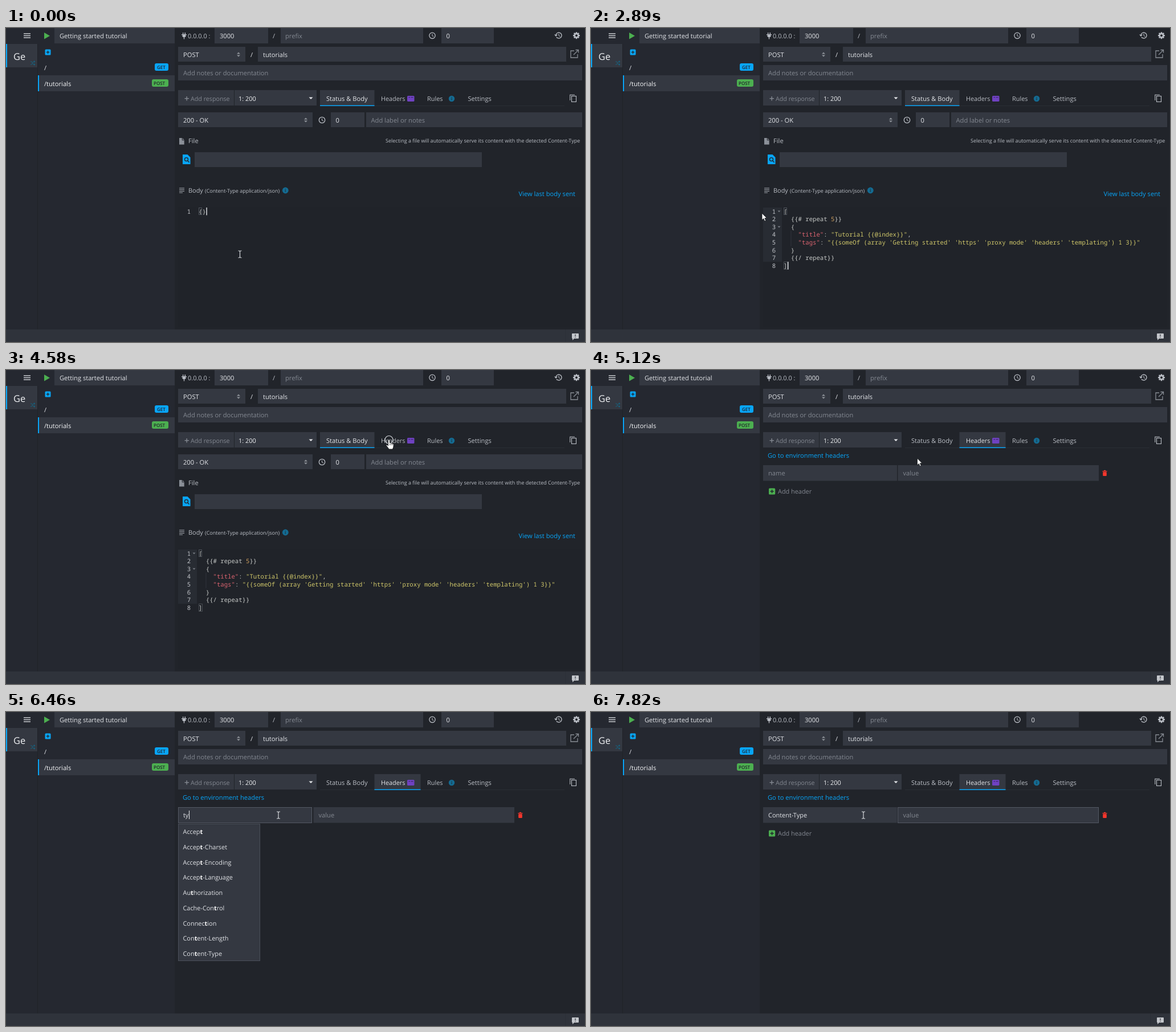
Recreate the animation shown at these times as an HTML page with a canvas. Size 1016x551 px, loop 8 s.

```html
<!DOCTYPE html>
<html lang="en">
<head>
<meta charset="utf-8">
<title>Mock response editor</title>
<style>
html, body { margin: 0; width: 100%; height: 100%; overflow: hidden; background: #21242a; }
canvas { display: block; width: 1016px; height: 551px; }
</style>
</head>
<body>
<canvas id="stage" width="1016" height="551"></canvas>
<script>
const ctx = document.getElementById('stage').getContext('2d');
const LOOP = 8000, STEP = 90;
const SANS = '"Open Sans", "Noto Sans", sans-serif';
const MONO = '"Noto Sans Mono", "DejaVu Sans Mono", monospace';
const C = {
  main: '#21242a', side: '#252830', field: '#343841', foot: '#2f333b', edge: '#1f2227',
  text: '#e2e4e8', soft: '#b9bdc4', mute: '#838891', blue: '#08a5f8', green: '#4caf50',
  purple: '#6f42c1', red: '#f5362c', info: '#146b92', code: '#c5c8c6', key: '#dc6470',
  str: '#cfc76a', num: '#d0a05f'
};

// ---- drawing helpers ----
function box(x0, y0, x1, y1, color, r) {
  ctx.fillStyle = color;
  ctx.beginPath();
  ctx.roundRect(x0, y0, x1 - x0, y1 - y0, r || 0);
  ctx.fill();
}
function text(s, x, y, color = C.text, size = 11.15, weight = 400, family = SANS) {
  ctx.font = `${weight} ${size}px ${family}`;
  ctx.fillStyle = color;
  ctx.fillText(s, x, y);
  return ctx.measureText(s).width;
}
function shape(pts, fill, stroke, width = 1, close = true) {
  ctx.beginPath();
  for (let i = 0; i < pts.length; i += 2) ctx.lineTo(pts[i], pts[i + 1]);
  if (close) ctx.closePath();
  if (fill) { ctx.fillStyle = fill; ctx.fill(); }
  if (stroke) { ctx.strokeStyle = stroke; ctx.lineWidth = width; ctx.stroke(); }
}
const line = (pts, color, width = 1) => shape(pts, null, color, width, false);
function ring(x, y, r, color, width, from = 0, to = Math.PI * 2) {
  ctx.strokeStyle = color;
  ctx.lineWidth = width;
  ctx.beginPath();
  ctx.arc(x, y, r, from, to);
  ctx.stroke();
}
function disc(x, y, r, color) {
  ctx.fillStyle = color;
  ctx.beginPath();
  ctx.arc(x, y, r, 0, Math.PI * 2);
  ctx.fill();
}
function frame(x0, y0, x1, y1, color) {
  ctx.strokeStyle = color;
  ctx.lineWidth = 1;
  ctx.strokeRect(x0 + .5, y0 + .5, x1 - x0 - 1, y1 - y0 - 1);
}

// ---- icons ----
function clock(x, y) {
  ring(x, y, 5.2, C.soft, 1.3);
  line([x, y - 3, x, y + .5, x + 2.5, y + 1.5], C.soft);
}
function sorter(x, y) {
  shape([x - 3, y - 1, x, y - 4, x + 3, y - 1], '#90949b');
  shape([x - 3, y + 1, x, y + 4, x + 3, y + 1], '#90949b');
}
function info(x, y, r) {
  disc(x, y, r, C.info);
  box(x - .6, y - .8, x + .6, y + 2.6, '#20303b');
  box(x - .6, y - 2.9, x + .6, y - 1.7, '#20303b');
}
function plus(x, y, r, color, ink) {
  box(x - r, y - r, x + r, y + r, color, 1.5);
  line([x - r * .55, y, x + r * .55, y], ink, 1.5);
  line([x, y - r * .55, x, y + r * .55], ink, 1.5);
}
function gear(x, y) {
  for (let i = 0; i < 8; i++) {
    const a = i * Math.PI / 4, c = Math.cos(a), s = Math.sin(a);
    line([x + c * 3, y + s * 3, x + c * 6, y + s * 6], C.soft, 2.4);
  }
  ring(x, y, 3.3, C.soft, 2.6);
}
function trash(x) {
  box(x, 177, x + 8, 178.4, C.red);
  box(x + 2.5, 175.8, x + 5.5, 177, C.red);
  box(x + .7, 179, x + 7.3, 186, C.red, 1);
}

// ---- fixed parts ----
function chrome() {
  box(0, 0, 1016, 551, C.main);
  box(0, 0, 296, 529, C.side);
  box(55, 28, 56, 529, C.edge);

  for (const y of [10, 13.5, 17]) line([31, y, 43, y], '#d3d6da', 1.4);
  shape([67, 8, 77, 13.7, 67, 19.5], C.green);
  box(85, 0, 296, 27, C.field);
  text('Getting started tutorial', 94, 18);

  box(0, 28, 55, 69, C.field);
  box(0, 28, 2, 69, C.blue);
  text('Ge', 13, 56, '#f0f2f4', 16.4);
  line([43, 59, 45, 59, 48, 64, 51, 64], '#17607d');
  line([43, 64, 45, 64, 48, 59, 51, 59], '#17607d');
  shape([49, 57, 51.5, 59, 49, 61], '#17607d');
  shape([49, 62, 51.5, 64, 49, 66], '#17607d');

  plus(73.5, 42.5, 5, C.blue, '#20303b');
  text('/', 67, 74);
  box(261, 62, 285, 75, C.blue, 3);
  text('GET', 265, 71.5, '#20242b', 8, 600);
  box(56, 83, 296, 111, C.field);
  box(56, 83, 58, 111, C.blue);
  text('/tutorials', 67, 102, '#f3f4f6');
  box(256, 90, 285, 103, C.green, 3);
  text('POST', 259, 99.5, '#20242b', 8, 600);

  // server bar
  box(310, 8, 311.3, 11, C.soft);
  box(313.6, 8, 315, 11, C.soft);
  box(308, 11, 317, 12.4, C.soft);
  box(309.3, 12, 315.7, 16, C.soft, 2.5);
  box(311.8, 15, 313.2, 19.5, C.soft);
  text('0.0.0.0 :', 319, 18, C.soft, 10.9);
  box(366, 0, 460, 27, C.field);
  text('3000', 375, 18);
  text('/', 468, 18, C.soft);
  box(482, 0, 732, 27, C.field);
  text('prefix', 490, 18, C.mute);
  clock(748, 13.3);
  box(764, 0, 856, 27, C.field);
  text('0', 772.5, 18);
  ring(970, 13, 5, C.soft, 1.3, -2.8, 2.5);
  shape([962, 11.5, 968, 11.5, 965, 15], C.soft);
  line([970, 10, 970, 13.5, 972.5, 15], C.soft);
  gear(1001, 13.2);

  // route settings
  box(302, 33, 420, 59, C.field);
  text('POST', 311, 51);
  sorter(408, 46.5);
  text('/', 429, 51);
  box(442, 33, 983, 59, C.field);
  text('tutorials', 451, 51);
  line([997, 40, 991, 40, 991, 52, 1003, 52, 1003, 46], '#888d95', 1.3);
  line([996, 47, 1004.5, 38.5], '#888d95', 1.3);
  line([999.5, 38.5, 1004.5, 38.5, 1004.5, 43.5], '#888d95', 1.3);
  box(302, 65, 1011, 92, C.field);
  text('Add notes or documentation', 311, 83, C.mute);

  // response picker
  box(302, 109, 400, 136, C.field);
  line([313.5, 123.7, 321, 123.7], C.mute, 1.4);
  line([317.2, 120, 317.2, 127.5], C.mute, 1.4);
  text('Add response', 324, 128, C.mute, 10.7);
  box(401, 109, 545, 136, C.field);
  text('1: 200', 408, 128, '#f0f2f4', 10.9);
  shape([531.5, 121.5, 538.5, 121.5, 535, 125], '#e8eaed');
  box(551, 136, 980, 137, '#2a2e35');
  ctx.strokeStyle = C.soft;
  ctx.lineWidth = 1.1;
  ctx.strokeRect(992.5, 119.5, 8, 10);
  line([989.8, 127, 989.8, 117.2, 998, 117.2], C.soft, 1.1);

  // footer
  box(0, 529, 1016, 551, C.foot);
  box(981, 529, 982, 551, '#2c3037');
  box(993, 536, 1005, 545, '#c3c6cb', 1);
  shape([994, 544, 998, 544, 994, 548], '#c3c6cb');
  box(998.4, 537.5, 999.6, 541, C.foot);
  box(998.4, 542, 999.6, 543.2, C.foot);
}

function tabs(headers) {
  const [x0, x1] = headers ? [646.5, 727.5] : [551, 646.5];
  box(x0, 109, x1, 137, C.field);
  box(x0, 135.4, x1, 137, C.blue);
  text('Status & Body', 562, 128, headers ? C.soft : C.text);
  text('Headers', 658, 128, headers ? C.text : C.soft, 10.85);
  box(704, 119, 716.5, 129, C.purple, 1.5);
  box(706.5, 121, 709, 122.4, '#432a76');
  box(710.5, 121, 714.5, 122.4, '#432a76');
  text('Rules', 739, 128, C.soft, 10.9);
  info(782, 124, 5.2);
  text('Settings', 810.5, 128, C.soft);
}

function bodyPage() {
  box(302, 148, 538, 174, C.field);
  text('200 - OK', 311, 166);
  sorter(526, 161.5);
  clock(554.5, 161.5);
  box(570, 148, 629, 174, C.field);
  text('0', 578.5, 166);
  box(632, 148, 1011, 174, C.field);
  text('Add label or notes', 640.5, 166, C.mute);

  shape([304, 193, 309.5, 193, 312.7, 196.5, 312.7, 204.5, 304, 204.5], '#8b9098');
  line([309.3, 193, 309.3, 196.8, 312.7, 196.8], C.main);
  text('File', 320, 202, C.soft);
  text('Selecting a file will automatically serve its content with the detected Content-Type',
    666, 200.5, C.soft, 9.04);
  shape([310, 222, 318.5, 222, 323.5, 227, 323.5, 239, 310, 239], C.blue);
  ring(316.5, 230.5, 3, '#20303b', 1.5);
  line([318.6, 232.8, 321.5, 235.8], '#20303b', 1.6);
  box(331, 218, 835, 244, C.field);

  [281, 283.7, 286.4, 289].forEach((y, i) => line([304, y, i === 3 ? 310 : 313, y], '#a5a9b0'));
  text('Body', 320, 289, C.soft, 10.9);
  text('(Content-Type application/json)', 349, 288.5, C.soft, 9.04);
  info(490.3, 285, 5.4);
  text('View last body sent', 899.5, 295, C.blue);
}

// ---- code editor ----
const X0 = 338, CH = 6.39, Y0 = 315, ROW = 13.6;
const CODE = [
  [['[', 'code']],
  [['  {{# repeat ', 'code'], ['5', 'num'], ['}}', 'code']],
  [['  {', 'code']],
  [['    ', 'code'], ['"title"', 'key'], [': ', 'code'], ['"Tutorial {{@index}}"', 'str'], [',', 'code']],
  [['    ', 'code'], ['"tags"', 'key'], [': ', 'code'],
    ["\"{{someOf (array 'Getting started' 'https' 'proxy mode' 'headers' 'templating') 1 3}}\"", 'str']],
  [['  }', 'code']],
  [['  {{/ repeat}}', 'code']],
  [[']', 'code']]
];
const BRIEF = [[['{}', 'code']]];

function editor(t) {
  const pasted = t >= 2340, rows = pasted ? CODE : BRIEF, last = rows.length - 1;
  box(302, 314, 1011, 524, '#202329');
  if (pasted) {
    box(302, 315, 335, Y0 + ROW * last, '#282c33');
    for (const r of [0, 2]) {
      const y = Y0 + r * ROW + 5.5;
      shape([327.5, y, 332.5, y, 330, y + 2.8], '#777c84');
    }
    box(350.5, Y0 + 3 * ROW, 351.5, Y0 + 5 * ROW, '#31353c');
  }
  const picked = !pasted && t >= 1350;
  if (picked) box(t < 1440 ? X0 + CH : X0, Y0, X0 + 2 * CH, Y0 + ROW, '#454b56');
  rows.forEach((row, r) => {
    const y = Y0 + r * ROW + 10.6;
    text(r + 1, 317.7, y, '#c2c5ca', 10.65, 400, MONO);
    let col = 0;
    for (const [s, kind] of row) {
      text(s, X0 + col * CH, y, C[kind], 10.65, 400, MONO);
      col += s.length;
    }
  });
  if (!picked && (t < 1350 || t >= 2430)) {
    frame(X0, 315, X0 + 6, 328, '#4b5058');
    if (pasted) frame(X0, 410, X0 + 7, 424, '#45494f');
  }
  const on = t < 540 || (t >= 1080 && t < 1990) || (pasted && t < 2980) || (t >= 3520 && t < 4050);
  if (on) {
    const col = pasted ? 1 : t < 1350 ? 2 : t < 1440 ? 1 : 0;
    const x = X0 + col * CH + (col ? .6 : 0), y = Y0 + ROW * last;
    box(x, y, x + 1.5, y + ROW, '#d8dade');
  }
}

// ---- headers page ----
const OPTIONS = ['Accept', 'Accept-Charset', 'Accept-Encoding', 'Accept-Language', 'Authorization',
  'Cache-Control', 'Connection', 'Content-Length', 'Content-Type'];

function dropdown(list, match) {
  const h = 26.75, end = 196 + list.length * h;
  box(302, 196, 446, end, C.field);
  frame(302, 196, 446, Math.round(end), '#4a4f59');
  list.forEach((s, i) => {
    const at = s.toLowerCase().indexOf(match), y = 214 + i * h, to = at + match.length;
    let x = 310.5;
    x += text(s.slice(0, at), x, y, C.text, 10.9);
    x += text(s.slice(at, to), x, y, '#fff', 10.9, 700);
    text(s.slice(to), x, y, C.text, 10.9);
  });
}

function headersPage(t) {
  const name = t >= 7100 ? 'Content-Type' : t >= 6640 ? 'typ' : t >= 6460 ? 'ty' : t >= 6280 ? 't' : '';
  const shift = t >= 6370 && t < 7100 ? 1 : 0;
  text('Go to environment headers', 310, 154, C.blue);
  box(302, 167, 537, 194.5, C.field);
  box(538.5 + shift, 167, 891 + shift, 194.5, C.field);
  if (t >= 7100) frame(538, 167, 891, 195, '#535863');
  else if (t >= 5570) frame(302, 167, 537, 195, '#535863');
  const w = name ? text(name, 311, 185, C.text, 10.95) : 0;
  if (!name && t < 5570) text('name', 311, 185, C.mute);
  else if (!name) text('name', 311.5, 185, C.mute);
  text('value', 547.5 + shift, 185, C.mute);
  trash(897.5 + shift);
  const blank = t < 5570 || (t >= 6100 && t < 6280) || t >= 7820;
  if (!blank) {
    const x = t >= 7360 ? 548 : Math.round(311.6 + w);
    box(x, 173, x + 1, 188, '#eceef0');
  }
  if (t >= 6370 && t < 6550) dropdown(OPTIONS, 't');
  else if (t >= 6550 && t < 7100) dropdown(['Content-Type'], t < 6640 ? 'ty' : 'typ');
  if (t < 6370 || t >= 7100) {
    plus(317.6, 213, 5.6, C.green, '#20242b');
    text('Add header', 328, 217, C.mute, 10.9);
  }
}

// ---- pointer ----
const PATH = [
  [450, 410.5, 397], [1260, 355, 322], [1530, 300, 325], [2890, 300, 325], [3610, 515, 242],
  [4490, 672, 122], [4670, 672, 122], [5120, 572.5, 155], [5300, 520, 174], [5480, 478, 181]
];

function pointerAt(t) {
  if (t <= PATH[0][0]) return PATH[0].slice(1);
  for (let i = 1; i < PATH.length; i++) {
    const [a, ax, ay] = PATH[i - 1], [b, bx, by] = PATH[i];
    if (t >= b) continue;
    const k = Math.floor((t - a) / STEP) * STEP / (b - a);
    return [ax + (bx - ax) * k, ay + (by - ay) * k];
  }
  return PATH[PATH.length - 1].slice(1);
}

function pointerKind(x, y, headers) {
  const within = (x0, y0, x1, y1) => x >= x0 && x < x1 && y >= y0 && y < y1;
  if (within(551, 109, 860, 137)) return hand;
  const fields = headers
    ? [[302, 167, 537, 195], [539, 167, 891, 195]]
    : [[336, 315, 1011, 524], [331, 218, 835, 244], [570, 148, 629, 174], [632, 148, 1011, 174]];
  return fields.some(f => within(...f)) ? beam : arrow;
}

function beam() {
  const color = '#d4d7db';
  line([0, -5.5, 0, 5.5], color, 1.2);
  line([-3, -6, -1, -6, 0, -5, 1, -6, 3, -6], color, 1.1);
  line([-3, 6, -1, 6, 0, 5, 1, 6, 3, 6], color, 1.1);
}
function arrow() {
  shape([0, 0, 0, 12, 2.8, 9.4, 4.8, 14, 6.8, 13.1, 4.9, 8.7, 8.4, 8.4], '#fff', '#15171b', .8);
}
function hand() {
  ctx.beginPath();
  ctx.moveTo(-1.5, 11);
  ctx.lineTo(-1.5, 1);
  ctx.quadraticCurveTo(0, -1.5, 1.5, 1);
  ctx.lineTo(1.5, 6);
  ctx.quadraticCurveTo(3, 4.7, 4, 6.6);
  ctx.quadraticCurveTo(5.4, 5.5, 6.3, 7.2);
  ctx.quadraticCurveTo(8.2, 6.5, 8.3, 9);
  ctx.quadraticCurveTo(8.3, 13.5, 6.5, 17);
  ctx.lineTo(0, 17);
  ctx.quadraticCurveTo(-2.5, 13, -4.8, 10.5);
  ctx.quadraticCurveTo(-4.5, 8.2, -1.5, 10.5);
  ctx.closePath();
  ctx.fillStyle = '#fff';
  ctx.fill();
  ctx.strokeStyle = '#15171b';
  ctx.lineWidth = .9;
  ctx.stroke();
  for (const x of [1.6, 4, 6.3]) line([x, 7, x, 10], '#33363b', .8);
}

function pointer(t, headers) {
  const [x, y] = pointerAt(t);
  if (t >= 4580 && t < 4670) ring(x, y + .5, 7, '#d5d8dc', 1.2);
  ctx.save();
  ctx.translate(x, y);
  pointerKind(x, y, headers)();
  ctx.restore();
}

function draw(now) {
  const t = now % LOOP, headers = t >= 4670;
  ctx.textRendering = 'geometricPrecision';
  chrome();
  tabs(headers);
  if (headers) headersPage(t);
  else {
    bodyPage();
    editor(t);
  }
  pointer(t, headers);
}

let start;
function tick(now) {
  if (start === undefined) start = now;
  draw(now - start);
  requestAnimationFrame(tick);
}
requestAnimationFrame(tick);
</script>
</body>
</html>
```
